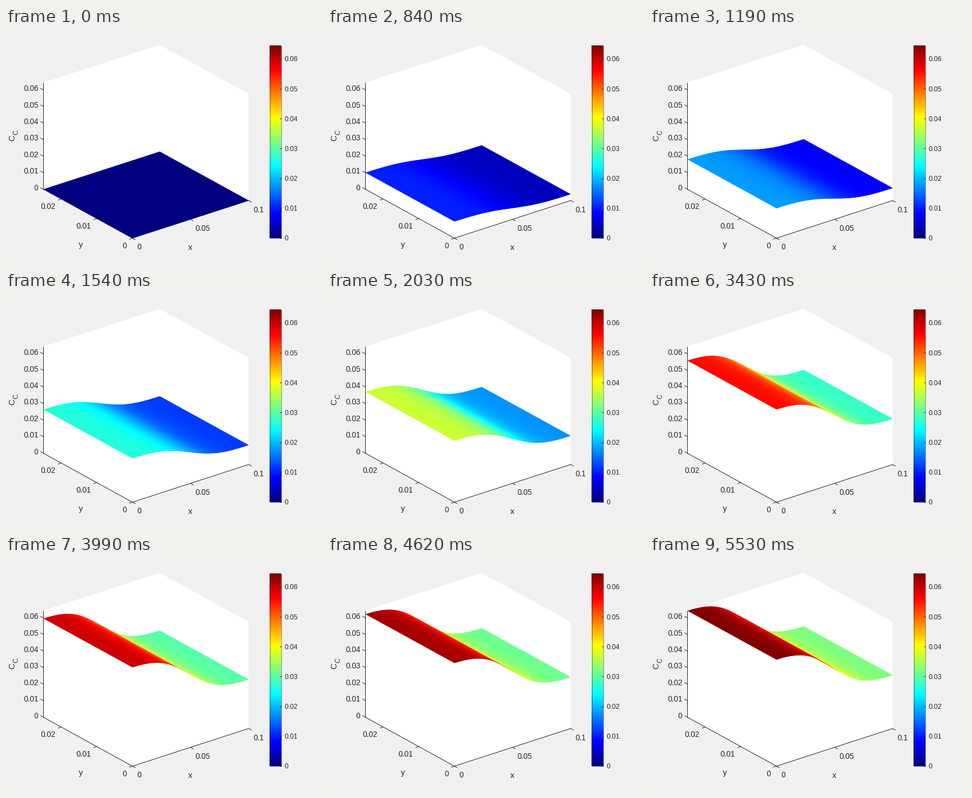
Animation of 560 by 420 pixels, one loop 5600 ms. Source, as a matplotlib script:

```python
import numpy as np
import matplotlib.pyplot as plt
from matplotlib.animation import FuncAnimation
from matplotlib.collections import PolyCollection

plt.rcParams["font.family"] = "Liberation Sans"
W, H, DPI = 560, 420, 100
FRAMES, INTERVAL = 80, 70
INK = "#262626"

# Screen vectors (pixels) of the box: full x, full y, full z
ORIGIN = np.array([224.0, 374.0])
EX = np.array([206.0, -67.0])
EY = np.array([-157.6, -87.0])
TOP = 190.0
X_MAX, Y_MAX, Z_MAX = 0.1, 0.025, 0.0645
STRIPS = 160

fig = plt.figure(figsize=(W / DPI, H / DPI), dpi=DPI, facecolor="#f0f0f0")
ax = fig.add_axes([0, 0, 1, 1])
ax.axis("off")


def jet(v):
    v = np.asarray(v)[..., None]
    return np.clip(1.5 - np.abs(4 * v - np.array([3, 2, 1])), 0, 1)


def line(a, b, z=2):
    ax.plot([a[0], b[0]], [a[1], b[1]], color=INK, lw=0.72, zorder=z,
            solid_capstyle="butt")


def label(x, y, s, px=13.5, ha="center", rot=0):
    ax.text(x, y, s, size=px * 72 / DPI, color=INK, ha=ha,
            va="center_baseline", rotation=rot, zorder=5)


def tick(p, along):
    line(p, p + 6 * along / np.hypot(*along))


def number(i, step=0.01):
    return f"{i * step:.2f}" if i else "0"


def draw_box():
    up = np.array([0, -TOP])
    corners = [ORIGIN, ORIGIN + EX, ORIGIN + EX + up, ORIGIN + EX + EY + up,
               ORIGIN + EY + up, ORIGIN + EY]
    ax.add_patch(plt.Polygon(corners, fc="white", ec="none", zorder=1))
    line(ORIGIN, ORIGIN + EX)
    line(ORIGIN, ORIGIN + EY)
    line(ORIGIN + EY, ORIGIN + EY + up)

    for v, s in ((0, "0"), (0.05, "0.05"), (0.1, "0.1")):
        p = ORIGIN + EX * v / X_MAX
        tick(p, -EY)
        label(p[0] + 8.3, p[1] + 15, s, ha="left")
    for i in range(3):
        p = ORIGIN + EY * i * 0.01 / Y_MAX
        tick(p, -EX)
        label(p[0] - 10, p[1] + 12.2, number(i), ha="right")
    for i in range(7):
        p = ORIGIN + EY + up * i * 0.01 / Z_MAX
        tick(p, EY)
        label(57.5, p[1] - 3.7, number(i), ha="right")

    label(326.5, 389.2, "x", 14.7)
    label(132.5, 384.2, "y", 14.7)
    label(11.3, 196.2, "C", 14.7, rot=90)
    label(18.3, 186.2, "C", 11.7, rot=90)


def draw_colorbar():
    left, right, top, bottom = 467, 488, 31, 374
    ramp = jet(np.linspace(1, 0, 256))[:, None]
    ax.imshow(ramp, extent=(left, right, bottom, top), aspect="auto",
              interpolation="nearest", zorder=2)
    ax.add_patch(plt.Rectangle((left + 0.5, top + 0.5), right - left - 1,
                               bottom - top - 1, fc="none", ec=INK,
                               lw=0.72, alpha=0.5, zorder=3))
    for i in range(7):
        y = bottom - (bottom - top) * i * 0.01 / Z_MAX
        line((right - 3, y), (right, y), 3)
        label(493.5, y, number(i), 12, ha="left")


def edge_heights(n):
    """Surface height in pixels at x = 0 and at x = X_MAX."""
    near = 195 * (1 - np.cosh(n / 24) ** (-0.057 * 24))
    return near, near * (0.501 - 0.3 * np.exp(-0.075 * n))


def profile(u, n):
    near, far = edge_heights(n)
    mean, half = (near + far) / 2, (near - far) / 2
    wave = 1.08 * np.cos(np.pi * u) - 0.08 * np.cos(3 * np.pi * u)
    sag = 0.044 * np.sin(np.pi * u) ** 2
    return mean + half * (wave - sag)


draw_box()
draw_colorbar()
ax.set_xlim(0, W)
ax.set_ylim(H, 0)
surface = PolyCollection([], linewidths=0, zorder=4)
ax.add_collection(surface, autolim=False)
u = np.linspace(0, 1, STRIPS + 1)


def update(n):
    h = profile(u, n)
    front = ORIGIN + u[:, None] * EX - h[:, None] * np.array([0, 1])
    back = front + EY
    # Far strips first; each reaches under its nearer neighbour's edge
    order = np.arange(STRIPS)[::-1]
    reach = np.minimum(order + 2, STRIPS)
    surface.set_verts(np.stack(
        [front[order], front[reach], back[reach], back[order]], axis=1))
    mid = (h[order] + h[order + 1]) / 2
    surface.set_facecolor(jet(np.clip(mid / TOP, 0, 1)))
    return (surface,)


anim = FuncAnimation(fig, update, frames=FRAMES, interval=INTERVAL,
                     repeat=True, repeat_delay=0, blit=False)
plt.show()
```
